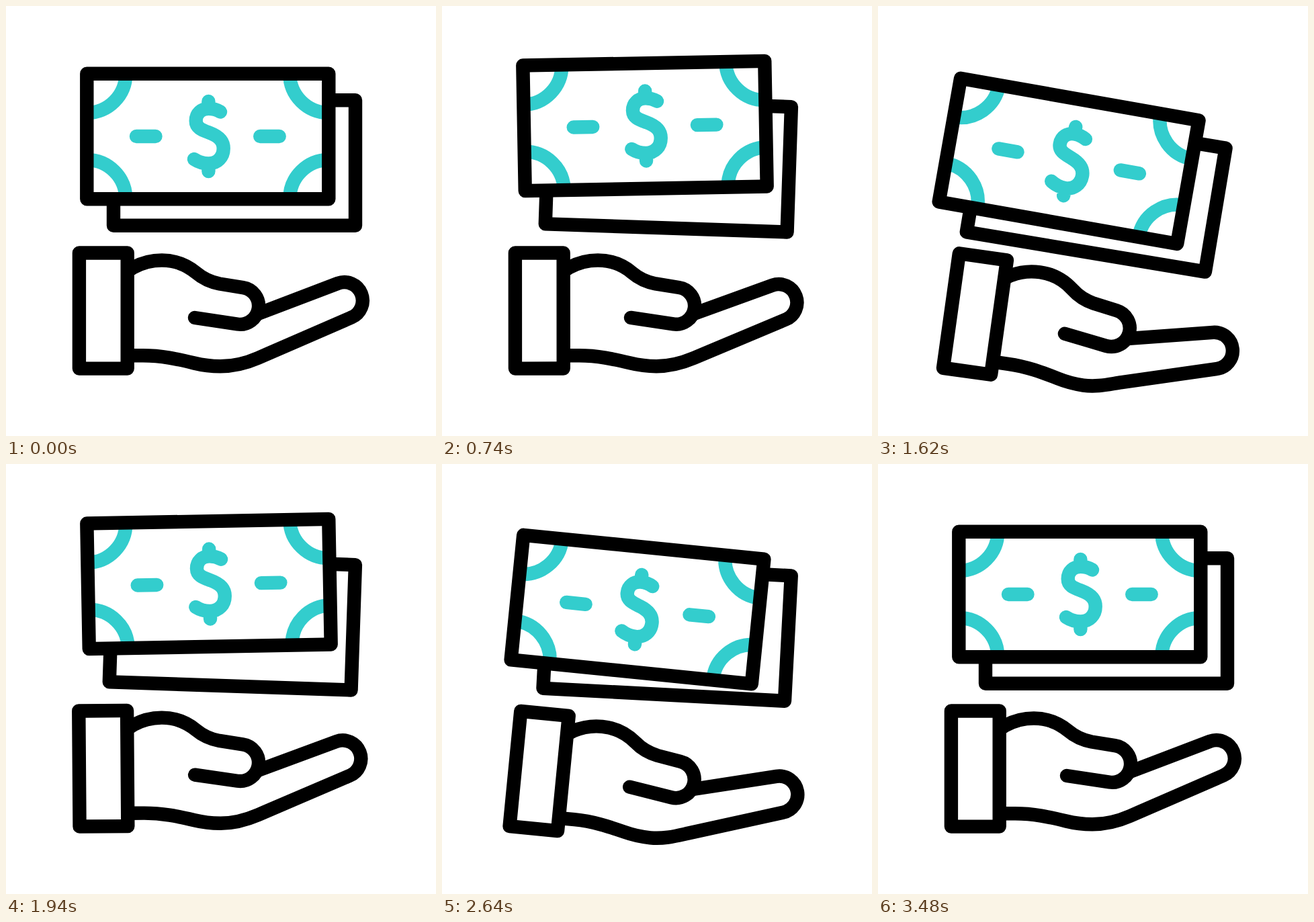
Recreate the animation shown at these times as an HTML page. Size 640 px wide and 640 px high, loop 3.6 s.

```html
<!DOCTYPE html>
<html lang="en">
<head>
<meta charset="utf-8">
<title>Hand and banknotes</title>
<style>
  html, body { margin: 0; width: 100%; height: 100%; overflow: hidden; background: #fff; }
  svg { display: block; width: 100vw; height: 100vh; }
</style>
</head>
<body>
<svg viewBox="0 0 640 640" fill="none" stroke="#000" stroke-width="20.4" stroke-linejoin="round">
  <rect id="back" x="160" y="140.3" width="360" height="186.5"/>
  <g id="front">
    <rect x="120.3" y="100.7" width="360" height="186.6" fill="#fff" stroke="none"/>
    <g stroke="#33cdcd">
      <path d="M178.3 101A58 58 0 0 1 120.3 159M422.3 101A58 58 0 0 0 480.3 159
               M120.3 229A58 58 0 0 1 178.3 287M480.3 229A58 58 0 0 0 422.3 287"/>
      <path stroke-linecap="round" d="M194 194H222.5M378.2 194H406.7M301.4 142V152M301.4 246V235
               M319 157.5C314 154.5 308 152.8 301.5 152.8C291 152.8 282.7 160 282.7 171
               C282.7 181.5 292 184.5 303 188.8C314 193 323.7 199 323.7 212
               C323.7 225 314.5 234.5 301.5 234.5C293.5 234.5 286 232 280 228"/>
    </g>
    <rect x="120.3" y="100.7" width="360" height="186.6"/>
  </g>
  <g id="hand" stroke-linecap="round">
    <rect x="108.9" y="367.5" width="71.8" height="172.1"/>
    <path d="M281 464L344.3 473.5A27.5 27.5 0 0 0 352.7 419.1L318 413.5C305 411 293 405.5 283 397
             C268 384.5 250 378.5 232 378.5C216 378.5 202 382.5 190 389L183 393.5"/>
    <path id="fingers"/>
  </g>
</svg>
<script>
const LOOP = 3600, END = 3400, FIRST = 400, LEG = 600;
const [back, front, hand, fingers] =
  ['back', 'front', 'hand', 'fingers'].map(id => document.getElementById(id));

// Swing from rest between +high and -low, then back to rest.
function swing(time, delay, high, low, first = high) {
  const t = Math.min(Math.max(time - delay, 0), END);
  const keys = [0, first, -low, high, -low, high, 0];
  const pos = t < FIRST ? t / FIRST : 1 + (t - FIRST) / LEG;
  const i = Math.min(Math.floor(pos), keys.length - 2);
  const p = pos - i;
  return keys[i] + (keys[i + 1] - keys[i]) * p * p * (3 - 2 * p);
}

function place(el, angle, x, y, lift = 0) {
  el.setAttribute('transform', `translate(0 ${lift}) rotate(${angle} ${x} ${y})`);
}

// Finger outline: knuckle, round tip, then the lower edge of the palm.
function fingerPath(dx, dy) {
  const r = 27.3, bend = dy / 128;
  const cx = 503.5 + dx, cy = 438.4 + dy;
  const rim = deg => {
    const a = deg * Math.PI / 180 + bend;
    return [cx + r * Math.cos(a), cy + r * Math.sin(a)];
  };
  const top = rim(-110.8), low = rim(66.6);
  const base = [375, 524];
  const len = Math.hypot(low[0] - base[0], low[1] - base[1]);
  const ctrl = base.map((v, i) => v - (low[i] - v) / len * 18.5);
  return `M374 458.5L${top}A${r} ${r} 0 0 1 ${low}L${base}` +
    `C${ctrl} 340 536.3 319 536.3C305 536.3 292 534.5 280 531.5C255 525.5 232 520.3 204 520.3H185`;
}

function draw() {
  const t = performance.now() % LOOP;
  place(back, swing(t, 80, 10, 10), 340, 140.3, swing(t, 60, 42.8, 43.5));
  place(front, swing(t, 20, 10, 10), 300.3, 100.7, swing(t, 0, 38.6, 51.2));
  place(hand, swing(t, 0, 8, 6, 9), 108.9, 453.6);
  fingers.setAttribute('d', fingerPath(swing(t, 0, 1.5, 5), swing(t, 0, 20, 8)));
  requestAnimationFrame(draw);
}
draw();
</script>
</body>
</html>
```
